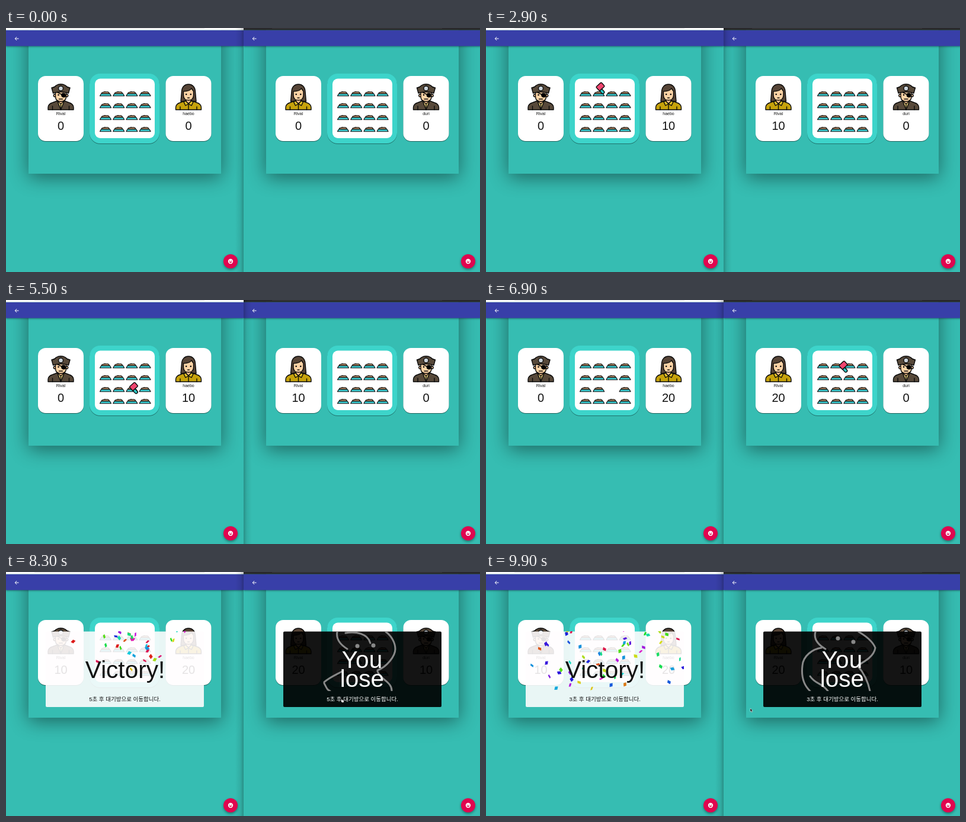
Recreate the animation shown at these times as an HTML page. Size 800 by 412 pixels, loop 10000 ms.

```html
<!DOCTYPE html>
<html lang="ko">
<head>
<meta charset="utf-8">
<title>Mole game</title>
<style>
html, body { margin: 0; width: 100%; height: 100%; overflow: hidden; background: #36bdb2; }
svg { display: block; }
text { font-family: "Liberation Sans", "Noto Sans CJK KR", "Noto Sans CJK", sans-serif; text-anchor: middle; fill: #111; }
.name { font-size: 7px; }
.score { font-size: 20px; }
.big { font-size: 40.5px; }
.note { font-size: 9.5px; }
.light text { fill: #fff; }
.ink { stroke: #0a0a0a; stroke-width: 1.4; stroke-linejoin: round; stroke-linecap: round; }
.card { fill: #fff; filter: drop-shadow(0 1px .6px #0007); }
.panel { fill: #36bdb2; filter: drop-shadow(0 6px 16px #0007); }
.figure { fill: none; stroke: #888; stroke-width: 3; stroke-linecap: round; }
</style>
</head>
<body>
<svg id="stage" width="800" height="412" viewBox="0 0 800 412"></svg>
<script>
const LOOP = 10000, END = 7850, RIGHT = 401;
const $ = id => document.getElementById(id);
const clamp = v => Math.max(0, Math.min(1, v));
const show = (el, on) => el.setAttribute('display', on ? 'inline' : 'none');

let seed = 11;
const rnd = () => (seed = seed * 16807 % 2147483647) / 2147483647;

const defs = `<defs>
<linearGradient id="edge"><stop stop-color="#000" stop-opacity="0"/><stop offset=".6" stop-color="#000" stop-opacity=".08"/><stop offset="1" stop-color="#000" stop-opacity=".24"/></linearGradient>
<clipPath id="rain"><path d="M67 100H334V201H67Z"/></clipPath>
<g id="pirate" class="ink">
  <path fill="#57493a" d="M-21.5 44V40Q-21 34-14 32L-6 29H6L14 32Q21 34 21.5 40V44Z"/>
  <path fill="#e3c878" d="M-6 29L0 44 6 29Z"/><path d="M0 34V44M-14 38V44M14 38V44"/>
  <path fill="#f3bd8c" d="M-4 26H4V31L0 34-4 31Z"/>
  <circle cx="-10" cy="20" r="2.2" fill="#fbcb9b"/><circle cx="10" cy="20" r="2.2" fill="#fbcb9b"/>
  <path fill="#fdd3a5" d="M-9 12H9V22Q9 30 0 30T-9 22Z"/>
  <path d="M-9 13L9 22M-3 26H3"/><circle cx="4.5" cy="19.5" r="3.2"/><circle cx="-4" cy="19" r=".6"/>
  <path fill="#57493a" d="M-15.5 7Q-10 6-8 3Q0-1.500 8 3Q10 6 15.500 7L13 16Q0 12-13 16Z"/>
  <circle cy="8" r="4" fill="#ccd3da"/>
</g>
<g id="woman" class="ink">
  <path fill="#574537" d="M-13 30L-11.500 13C-11 5-6 1 0 1S11 5 11.500 13L13 30Z"/>
  <path fill="#c6a20b" d="M-21.5 44V40Q-21 34-14 32L-6 29H6L14 32Q21 34 21.5 40V44Z"/>
  <path fill="#f3bd8c" d="M-4 25H4V30L0 34-4 30Z"/>
  <path fill="#e0bd22" d="M-5 29L0 34-5 37-8 31ZM5 29L0 34 5 37 8 31Z"/>
  <path d="M0 35V44M-14 39V44M14 39V44"/>
  <path fill="#fdd3a5" d="M-8.500 13Q2 13 5 8L8.500 13V20Q8 28 0 28T-8.500 20Z"/>
  <circle cx="-3.8" cy="18" r=".6"/><circle cx="3.8" cy="18" r=".6"/><path d="M-1.500 24H1.500"/>
</g>
<g id="hole" class="ink" style="stroke-width:1.1">
  <path fill="#b98b66" d="M-6.500 0Q-7-2.500-4-2.500Q-1-4 1-3Q6-4 6.500 0Z"/>
  <path fill="#3bcbd0" d="M-9.500 3.800L-7.500 0H7.500L9.500 3.800Z"/>
</g>
</defs>`;

const card = (x, who, name, id) => `<rect class="card" x="${x - 38.5}" y="81" width="77" height="110" rx="13"/>
<use href="#${who}" x="${x}" y="94"/>
<text class="name" x="${x}" y="147">${name}</text><text class="score" id="${id}" x="${x}" y="172">0</text>`;

const holes = side => Array.from({length: 16}, (_, i) =>
  `<use href="#hole" id="${side}${i}" x="${168 + i % 4 * 22.2}" y="${111 + (i >> 2) * 20}"/>`).join('');

const gameWindow = (side, x, strip, first, second, name, overlay) => `
<svg x="${x}" width="401" height="412">
  <rect width="401" height="412" fill="#36bdb2"/>
  <rect class="panel" x="38" y="-20" width="325" height="266"/>
  <rect y="3.6" width="401" height="26.9" fill="#383fa8" style="filter:drop-shadow(0 1px 1.5px #0006)"/>
  <rect width="401" height="3.6" fill="${strip}"/><path d="M48 .3H335" stroke="#8886" stroke-width=".6"/>
  <path d="M21.500 18H15.300M18.200 15L15.200 18 18.200 21" fill="none" stroke="#fff"/>
  ${card(92.5, first, 'Rival', side + 'Rival')}
  <rect x="141" y="77" width="118" height="118" rx="18" fill="#3dd4ca" style="filter:drop-shadow(0 1px .6px #0006)"/>
  <rect x="150" y="85.5" width="101" height="100.5" rx="9" fill="#fff"/>
  ${holes(side)}
  ${card(308, second, name, side + 'Self')}
  <g id="${side}Over" display="none">${overlay}
    <text class="note" id="${side}Note" x="200.5" y="217.5"></text></g>
  <g transform="translate(379 394)">
    <circle r="12" fill="#e0054f" style="filter:drop-shadow(0 2px 2px #0006)"/>
    <circle r="4.2" fill="#fff"/>
    <path d="M-2.200-1.200h1.200M1-1.200h1.200M-2.200 1Q0 3.600 2.200 1Z" fill="#e0054f" stroke="#e0054f" stroke-width=".9"/>
  </g>
</svg>`;

const box = (fill, opacity) =>
  `<rect x="67" y="100.500" width="267" height="127.500" rx="2" fill="${fill}" fill-opacity="${opacity}"/>`;
const win = box('#fffdfe', .89) +
  '<g id="confetti" clip-path="url(#rain)"></g><text class="big" x="201" y="178.5">Victory!</text>';
const lose = box('#000', .92) + `<g clip-path="url(#rain)"><path id="figure" class="figure"/>
  <circle id="dotA" r="3.5" fill="#888"/><circle id="dotB" r="3.5" fill="#888"/></g>
  <text class="big" x="200" y="162">You</text><text class="big" x="200" y="194">lose</text>`;

$('stage').innerHTML = defs +
  gameWindow('L', 0, '#fafafa', 'pirate', 'woman', 'haebo', win) +
  gameWindow('R', RIGHT, '#29292b', 'woman', 'pirate', 'duri', lose) + `
<rect id="shade" width="14" height="412" fill="url(#edge)"/>
<g id="hammer" class="ink">
  <rect x="-1.5" y="2" width="10.5" height="5" rx="2.5" transform="rotate(47 1 1)" fill="#2cc7c4"/>
  <rect x="-6" y="-4.5" width="12" height="9" rx="1.5" transform="translate(-2 -2) rotate(-42)" fill="#f0456f"/>
</g>
<path id="hand" d="M-1-3V0L-2.500 0 0 3.500H3L3.500-.5 .5-1V-3Z" fill="#fff" stroke="#111" stroke-width=".7"/>
<path id="arrow" d="M0-2V4L1.400 2.700 2.400 5 3.400 4.500 2.400 2.300H4.200Z" fill="#111" stroke="#fff" stroke-width=".5"/>`;
$('ROver').classList.add('light');

// Confetti: each piece has a birth time, a fall speed and a spin, and spreads outwards.
const pieces = Array.from({length: 150}, (_, i) => {
  const el = document.createElementNS('http://www.w3.org/2000/svg', 'path');
  el.setAttribute('d', 'M-3.500-2.500H2.200L3.500 2.500H-2.200Z');
  el.setAttribute('fill', `hsl(${rnd() * 360 | 0} 80% 48%)`);
  $('confetti').append(el);
  const k = i / 150, side = rnd() + rnd() - 1;
  return {el, born: END + k * 2100, x: 215 - 15 * k + side * (85 + 75 * k),
    drift: side * 60, fall: 45 + rnd() * 125, turn: rnd() * 360, spin: (rnd() - .5) * 500};
});

// The line figure settles from one pose into the other.
const poses = [
  'M158 101C156 112 162 122 175 130M172 103C190 100 210 104 214 120M136 188C140 196 142 200 146 201M240 101C250 108 256 120 256 130M256 130C256 142 242 160 226 166M226 168C232 182 250 186 250 200M136 186C145 178 155 174 166 168',
  'M155 101C152 112 158 122 172 130M165 128C150 130 134 142 133 158M133 158C131 175 134 190 146 201M228 101C240 108 252 118 256 128M256 128C254 142 240 150 226 158M226 158C238 172 244 186 247 201M146 176C155 190 165 186 176 201'];
const mix = (a, b, k) => {
  const ends = b.match(/[\d.]+/g);
  let i = 0;
  return a.replace(/[\d.]+/g, v => +v + (ends[i++] - v) * k);
};

const mouse = [[1200, 250, 180], [2300, 197, 107], [2900, 195, 101], [3500, 197, 104], [4200, 233, 131],
  [5200, 222, 145], [5800, 213, 151], [6200, 250, 145], [6600, 560, 125], [6900, 605, 112], [7400, 615, 131],
  [7800, 595, 160], [8300, 567, 217], [8600, 560, 219], [9100, 447, 232], [LOOP, 446, 232]];
function mouseAt(t) {
  const i = Math.max(1, mouse.findIndex(p => p[0] > t));
  const a = mouse[i - 1], b = mouse[i];
  const k = clamp((t - a[0]) / (b[0] - a[0])), e = k * k * (3 - 2 * k);
  return [a[1] + (b[1] - a[1]) * e, a[2] + (b[2] - a[2]) * e];
}

function draw(t) {
  const over = t >= END, leftActive = t >= 1200 && t < 6400;
  const lead = t < 2500 ? 0 : t < 5800 ? 10 : 20, trail = t < 7400 ? 0 : 10;
  $('LSelf').textContent = $('RRival').textContent = lead;
  $('LRival').textContent = $('RSelf').textContent = trail;
  show($('L10'), t < 6600 || t > 7200);
  $('shade').setAttribute('transform', leftActive ? 'translate(415) scale(-1 1)' : 'translate(387)');

  const [x, y] = mouseAt(t);
  const bx = x % RIGHT, onBoard = bx > 141 && bx < 259 && y > 77 && y < 195;
  const cursor = t < 1200 ? '' : !over ? (onBoard ? 'hammer' : '') : t < 8600 ? 'hand' : 'arrow';
  for (const id of ['hammer', 'hand', 'arrow']) {
    show($(id), id === cursor);
    $(id).setAttribute('transform', `translate(${x} ${y})`);
  }

  for (const side of 'LR') {
    show($(side + 'Over'), over);
    $(side + 'Note').textContent = `${5 - Math.max(0, Math.floor((t - END) / 1000))}초 후 대기방으로 이동합니다.`;
  }
  if (!over) return;

  const k = clamp((t - 8300) / 600);
  $('figure').setAttribute('d', mix(...poses, k));
  $('dotA').setAttribute('transform', `translate(${192 + k} ${125 - 13 * k})`);
  $('dotB').setAttribute('transform', `translate(219 ${124 - 6 * k})`);
  for (const p of pieces) {
    const age = (t - p.born) / 1000;
    show(p.el, age > 0);
    p.el.setAttribute('transform', `translate(${p.x + p.drift * age} ${97 + p.fall * age + 25 * age * age}) rotate(${p.turn + p.spin * age}) scale(1 ${.75 + .25 * Math.cos(age * 7 + p.turn)})`);
  }
}

const start = performance.now();
(function tick() {
  draw((performance.now() - start) % LOOP);
  requestAnimationFrame(tick);
})();
</script>
</body>
</html>
```
